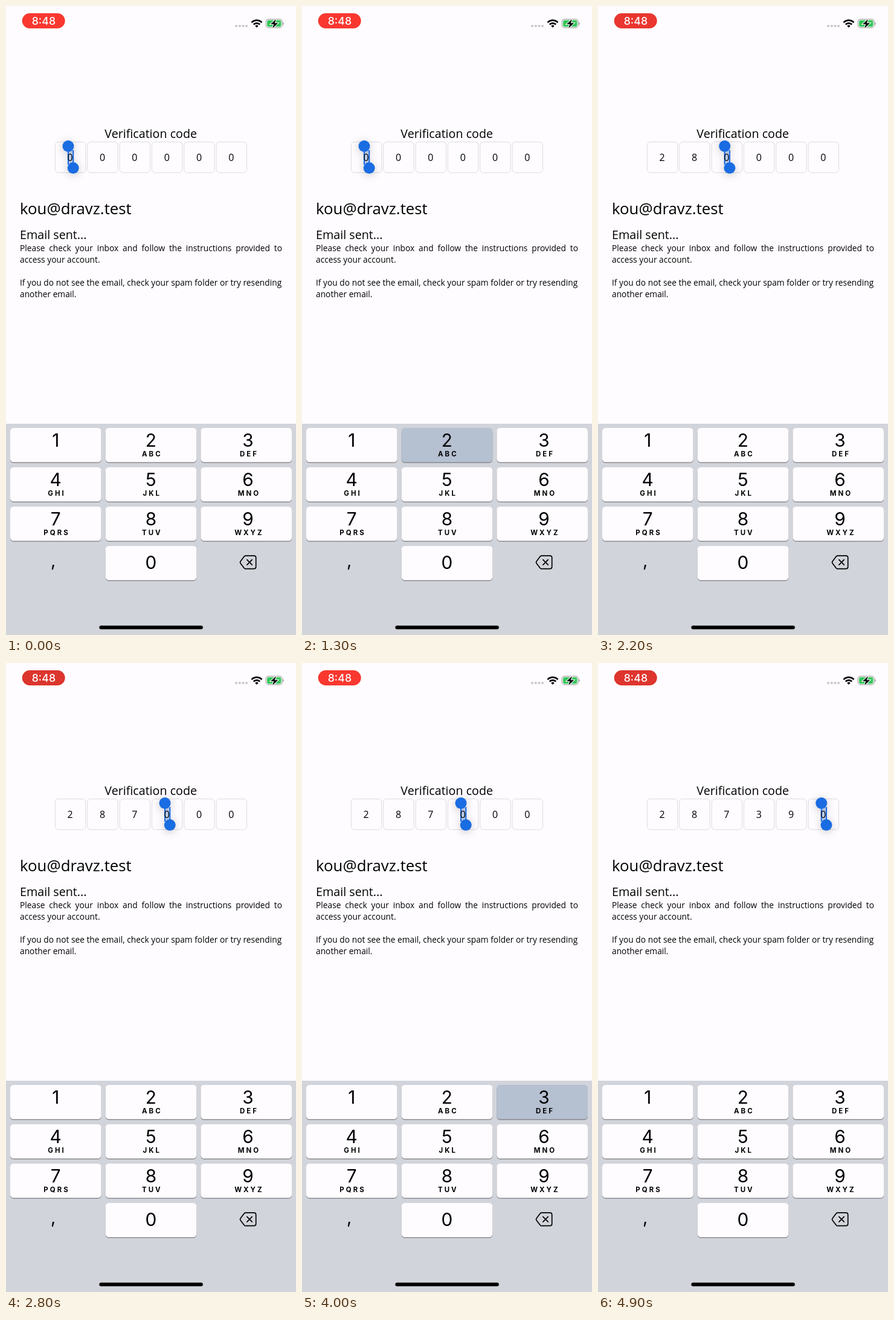
Animation of 480x1039 px, one loop 5 s. Source, as an HTML page:

```html
<!DOCTYPE html>
<html lang="en">
<head>
<meta charset="utf-8">
<title>Verification code</title>
<style>
  html, body { margin: 0; width: 100%; height: 100%; overflow: hidden; background: #fefcff; }
  svg { position: absolute; left: 0; top: 0; }
  svg text { font-family: "Open Sans", sans-serif; }
  svg .ui { font-family: Inter, sans-serif; }
  .mid { text-anchor: middle; }
  .letters { font-size: 11.5px; font-weight: 700; letter-spacing: 3px; }
  #note {
    position: absolute; left: 23px; top: 391.2px; width: 434px;
    font: 13.77px/18.87px "Open Sans", sans-serif; color: #000;
  }
  #note div { white-space: nowrap; height: 18.87px; }
  #note .wide { white-space: normal; text-align-last: justify; }
</style>
</head>
<body>
<svg width="480" height="1039" viewBox="0 0 480 1039">
  <!-- status bar -->
  <rect id="pill" x="26.7" y="12" width="71" height="25" rx="12.5"/>
  <text class="ui mid" x="62.4" y="30.9" font-size="17.8" font-weight="500" fill="#fff">8:48</text>
  <path d="M381 33h.01m5.8 0h.01m5.6 0h.01m5.6 0h.01" stroke="#c9c7cb" stroke-width="4.2" stroke-linecap="round"/>
  <g fill="none" stroke="#000" stroke-width="2.7">
    <path d="M406.5 27.2A11.9 11.9 0 0 1 423.5 27.2M409.8 30.5A7.4 7.4 0 0 1 420.2 30.5"/>
    <path d="M415 35.7l-2.7-2.8a3.9 3.9 0 0 1 5.4 0z" fill="#000" stroke="none"/>
  </g>
  <rect x="430.3" y="21.9" width="26.8" height="14" rx="4.2" fill="none" stroke="#a5a3a7" stroke-width="1.2"/>
  <path d="M458.4 26.5q1.8 .8 1.8 2.4t-1.8 2.4z" fill="#a5a3a7"/>
  <rect x="432" y="23.6" width="23.4" height="10.6" rx="2.7" fill="#34c759"/>
  <path d="M447 21.8l-9 8.2h5.2l-2 6.8 9-8.6h-5.4z" stroke="#fefcff" stroke-width="2" paint-order="stroke"/>

  <!-- form -->
  <text class="mid" x="239.7" y="218" font-size="19.7">Verification code</text>
  <g id="boxes"></g>
  <g id="selection">
    <rect x="103" y="238.5" width="8.2" height="23.5" fill="#1a6ce2" opacity=".25"/>
    <g fill="#1a6ce2" style="filter:drop-shadow(0 2px 7px rgba(0,0,0,.22))">
      <rect x="101.9" y="237" width="2.1" height="25"/>
      <rect x="110.2" y="238" width="2.1" height="25"/>
      <circle cx="103" cy="231.5" r="9.5"/>
      <circle cx="111.2" cy="267.6" r="9.5"/>
    </g>
  </g>
  <g id="digits"></g>
  <text x="23" y="344.3" font-size="25.8">kou@dravz.test</text>
  <text x="23" y="384.5" font-size="19.7">Email sent...</text>

  <!-- keyboard -->
  <rect y="690" width="480" height="349" fill="#d2d4db"/>
  <g id="keys"></g>
  <text class="ui mid" x="78.3" y="926" font-size="29">,</text>
  <g fill="none" stroke="#000" stroke-width="1.7" stroke-linecap="round" stroke-linejoin="round">
    <path d="M396.4 908.2H410.7a3 3 0 0 1 3 3V926.6a3 3 0 0 1-3 3H396.4q-1.2 0-2-.9l-6.4-8.3q-1-1.5 0-3l6.4-8.3q.8-.9 2-.9z"/>
    <path d="M398.9 914.7l8.4 8.4m0-8.4l-8.4 8.4"/>
  </g>
  <rect x="154.3" y="1023.6" width="171.6" height="6" rx="3"/>
</svg>
<div id="note">
  <div class="wide">Please check your inbox and follow the instructions provided to</div>
  <div>access your account.</div>
  <div></div>
  <div>If you do not see the email, check your spam folder or try resending</div>
  <div>another email.</div>
</div>
<script>
const LOOP = 5000, PITCH = 53.35;
const KEY_UP = '#fefcff', KEY_DOWN = '#b5c0d1';
const LABEL_X = [82.2, 239.9, 400.5];
const LETTERS = ['', 'ABC', 'DEF', 'GHI', 'JKL', 'MNO', 'PQRS', 'TUV', 'WXYZ'];
// A digit is entered when its key is released.
const PRESSES = [
  { digit: 2, down: 1180, up: 1380 },
  { digit: 8, down: 1780, up: 1980 },
  { digit: 7, down: 2380, up: 2580 },
  { digit: 3, down: 3880, up: 4080 },
  { digit: 9, down: 4380, up: 4580 },
];

const $ = id => document.getElementById(id);

function add(parent, tag, attrs, text = '') {
  const node = document.createElementNS('http://www.w3.org/2000/svg', tag);
  for (const name in attrs) node.setAttribute(name, attrs[name]);
  node.textContent = text;
  parent.append(node);
  return node;
}

const cells = Array.from({ length: 6 }, (_, i) => {
  const x = 81.4 + PITCH * i;
  add($('boxes'), 'rect', { x, y: 224.5, width: 50.4, height: 50.8, rx: 5.5, fill: 'none', stroke: '#dddbe0' });
  return add($('digits'), 'text', { x: x + 24.8, y: 256.2, 'font-size': 16, class: 'mid' });
});

const keys = {};
function addKey(digit, col, row) {
  const x = 7 + 157.7 * col, y = 697 + 65 * row, center = LABEL_X[col];
  const shape = { x, width: 150.6, height: 56.6, rx: 5.5 };
  add($('keys'), 'rect', { ...shape, y: y + 1.3, fill: '#898a8f' });
  keys[digit] = add($('keys'), 'rect', { ...shape, y });
  add($('keys'), 'text', { x: center, y: y + (digit ? 30.8 : 37.8), 'font-size': 29.8, class: 'ui mid' }, digit);
  if (digit) add($('keys'), 'text', { x: center + 1.9, y: y + 47.3, class: 'ui mid letters' }, LETTERS[digit - 1]);
}
for (let i = 0; i < 9; i++) addKey(i + 1, i % 3, Math.floor(i / 3));
addKey(0, 1, 3);

function pillColor(t) {
  const wave = 0.5 + 0.5 * Math.cos((t - 1650) / 1000 * Math.PI);
  const glow = wave * wave * (3 - 2 * wave);
  const mix = (dark, bright) => Math.round(dark + (bright - dark) * glow);
  return `rgb(${mix(220, 255)},${mix(53, 57)},${mix(46, 48)})`;
}

function draw(t) {
  $('pill').setAttribute('fill', pillColor(t));
  const entered = PRESSES.filter(p => t >= p.up);
  const held = PRESSES.find(p => t >= p.down && t < p.up);
  cells.forEach((cell, i) => cell.textContent = entered[i] ? entered[i].digit : 0);
  $('selection').setAttribute('transform', `translate(${PITCH * entered.length} 0)`);
  for (const digit in keys) {
    keys[digit].setAttribute('fill', held && held.digit === +digit ? KEY_DOWN : KEY_UP);
  }
}

const start = performance.now();
function tick() {
  draw((performance.now() - start) % LOOP);
  requestAnimationFrame(tick);
}
tick();
</script>
</body>
</html>
```
